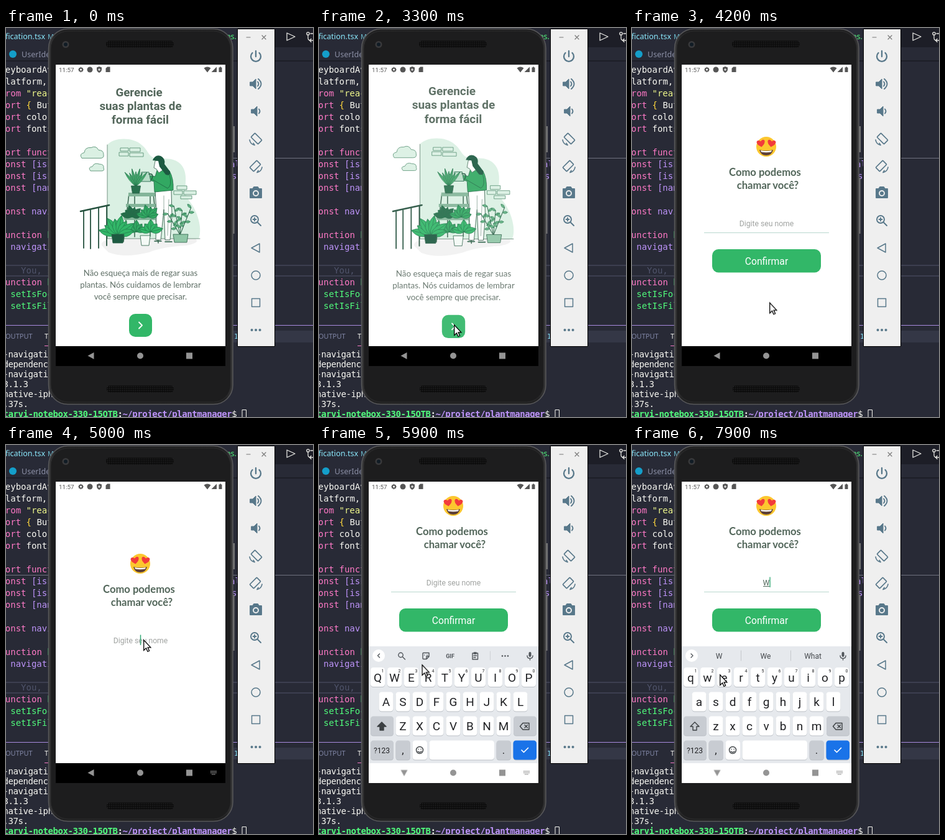
Animation, 494 px wide and 626 px high, one loop 8000 ms. Source, as an HTML page:

```html
<!DOCTYPE html>
<html lang="pt">
<head>
<meta charset="utf-8">
<title>Plant app demo</title>
<style>
html, body { margin: 0; width: 100%; height: 100%; overflow: hidden; background: #282a36; }
svg { display: block; width: 494px; height: 626px; }
text { white-space: pre; }
.code { font: 14px "DejaVu Sans Mono", monospace; }
.term { font: 14px "DejaVu Sans Mono", monospace; letter-spacing: -.43px; fill: #f8f8f2; }
.ui { font-family: "Noto Sans", sans-serif; }
.roboto { font-family: Roboto, sans-serif; }
.lato { font-family: Lato, sans-serif; }
.mid { text-anchor: middle; }
.line { fill: none; stroke-linecap: round; stroke-linejoin: round; }

#welcome, #form, #formBody, #cover, #caret, #keyboard, #nav, #back, #imeIcon, .before, .after, .tools, .hints {
  animation: 8s step-end infinite;
}
#welcome, #form { transform-origin: 216.5px 286px; }
#welcome { animation-name: leave; }
#form { animation-name: enter; }
#formBody { animation-name: lift; }
#cover { animation-name: cover; }
#caret { animation-name: blink; }
#keyboard { animation-name: slide; }
#nav { animation-name: navBar; }
#back { transform-origin: 137px 527.5px; animation-name: turn; }
#imeIcon { animation-name: imeIcon; }
#cursor { animation: pointer 8s linear infinite; }
.before { animation-name: untilTyped; }
.after { animation-name: onceTyped; }
.tools { animation-name: untilHints; }
.hints { animation-name: onceHints; }

@keyframes leave {
  0% { opacity: 1; transform: scale(1); }
  41.25% { opacity: .92; transform: scale(1.01); }
  42.5% { opacity: .72; transform: scale(1.04); }
  43.75% { opacity: .42; transform: scale(1.063); }
  45% { opacity: .14; transform: scale(1.065); }
  46.25%, 100% { opacity: 0; }
}
@keyframes enter {
  0% { opacity: 0; transform: scale(.97); }
  45% { opacity: .5; transform: scale(.98); }
  46.25% { opacity: .88; transform: scale(.995); }
  47.5%, 100% { opacity: 1; transform: none; }
}
@keyframes lift { 0% { transform: none; } 63.75%, 100% { transform: translateY(-93px); } }
@keyframes cover { 0% { opacity: 0; } 62.5% { opacity: 1; } 63.75%, 100% { opacity: 0; } }
@keyframes blink {
  0% { opacity: 0; transform: none; }
  61.25% { opacity: 1; }
  68.75% { opacity: 0; }
  75% { opacity: 1; }
  81.25% { opacity: 0; }
  87.5% { opacity: 1; transform: none; }
  93.75%, 100% { opacity: 1; transform: translateX(5.5px); }
}
@keyframes slide {
  0% { opacity: 0; transform: translateY(60px); }
  63.75% { opacity: .7; transform: translateY(22px); }
  65% { opacity: 1; transform: translateY(1px); }
  66.25%, 100% { opacity: 1; transform: none; }
}
@keyframes navBar { 0% { fill: #000; } 63.75% { fill: #aaa; } 65%, 100% { fill: #fff; } }
@keyframes turn {
  0% { transform: none; }
  63.75% { transform: rotate(-35deg); }
  65% { transform: rotate(-68deg); }
  66.25%, 100% { transform: rotate(-90deg); }
}
@keyframes imeIcon { 0% { opacity: 0; } 61.25%, 100% { opacity: 1; } }
@keyframes untilTyped { 0% { opacity: 1; } 93.75%, 100% { opacity: 0; } }
@keyframes onceTyped { 0% { opacity: 0; } 93.75%, 100% { opacity: 1; } }
@keyframes untilHints { 0% { opacity: 1; } 95%, 100% { opacity: 0; } }
@keyframes onceHints { 0% { opacity: 0; } 95%, 100% { opacity: 1; } }
@keyframes pointer {
  0% { opacity: 0; transform: translate(173px, 13px); animation-timing-function: step-end; }
  8.75% { opacity: 1; transform: translate(173px, 13px); animation-timing-function: step-end; }
  10% { opacity: 1; transform: translate(173px, 13px); animation-timing-function: steps(9); }
  21.25% { transform: translate(213px, 479px); animation-timing-function: step-end; }
  22.5% { transform: translate(217px, 477px); animation-timing-function: step-end; }
  51.25% { transform: translate(217px, 477px); animation-timing-function: steps(3); }
  55% { transform: translate(229px, 370px); animation-timing-function: steps(2); }
  57.5% { transform: translate(221px, 313px); animation-timing-function: step-end; }
  67.5% { transform: translate(221px, 313px); animation-timing-function: steps(8); }
  77.5% { transform: translate(132px, 377px); animation-timing-function: step-end; }
  78.75% { transform: translate(130px, 373px); animation-timing-function: steps(2); }
  81.25% { transform: translate(135px, 372px); animation-timing-function: step-end; }
  85% { transform: translate(137px, 372px); animation-timing-function: steps(4); }
  90% { transform: translate(120px, 370px); animation-timing-function: step-end; }
  97.5% { transform: translate(130px, 370px); animation-timing-function: step-end; }
  98.75%, 100% { opacity: 1; transform: translate(141px, 369px); }
}
</style>
</head>
<body>
<svg viewBox="0 0 494 626">
<defs>
  <linearGradient id="body"><stop offset="0" stop-color="#3b3b3c"/><stop offset=".04" stop-color="#222223"/><stop offset=".5" stop-color="#1c1c1d"/><stop offset=".96" stop-color="#222223"/><stop offset="1" stop-color="#39393a"/></linearGradient>
  <pattern id="mesh" width="3" height="3" patternUnits="userSpaceOnUse"><rect width="3" height="3" fill="#0b0b0b"/><circle cx="1.5" cy="1.5" r=".8" fill="#2b2b2c"/></pattern>
  <clipPath id="screen"><path d="M80 59h273v453H80z"/></clipPath>
  <clipPath id="display"><path d="M80 59h273v485H80z"/></clipPath>
  <path id="heart" d="M0 6Q-7.500 1-6.500-3.500Q-4-7 0-3Q4-7 6.500-3.500Q7.500 1 0 6z" fill="#f23b3b"/>
</defs>

<!-- Editor and terminal -->
<rect width="494" height="626" fill="#282a36"/>
<path d="M433 0h61v31h-61z" fill="#1d1e27"/>
<path d="M0 53h494" stroke="#1d1e27" stroke-width="2"/>
<path d="M0 209.500h494" stroke="#6f7180"/>
<path d="M0 382h494M0 399h494" stroke="#44475a" stroke-width="1.500"/>
<path d="M0 478.500h494" stroke="#a98be0"/>
<g class="ui">
  <text x="-1" y="18" font-size="12.500" fill="#8be9fd">fication.tsx</text>
  <text x="67" y="18" font-size="11" fill="#6fc3d3">M</text>
  <text x="350" y="18" font-size="12.500" fill="#50fa7b">tes.</text>
  <circle cx="11" cy="42" r="6" fill="#149eca"/>
  <text x="25" y="47" font-size="12.500" fill="#8b8fa5">UserIdentification</text>
  <text x="-1" y="500" font-size="11" fill="#8086a6">OUTPUT</text>
  <text x="62" y="500" font-size="11" fill="#f8f8f2">TERMINAL</text>
</g>
<path d="M62 511.500h50" stroke="#ff79c6"/>
<path d="M366 487h128v19H366z" fill="#343746"/>
<g class="line" stroke="#e4e4e0" stroke-width="1.300">
  <path d="M452 8v12l13-6zM486 11v5q0 4 4 4h4M491 17.500l-2.500 2.500 2.500 2.500M490 9h4"/><circle cx="486" cy="9" r="2.200"/>
</g>
<g id="code" class="code"></g>
<g id="terminal" class="term"></g>
<path d="M380 614.500h6.500v12h-6.500z" fill="none" stroke="#f8f8f2"/>

<!-- Phone -->
<path d="M364 158h4v42h-4zM364 241h3.500v90H364z" fill="#777"/>
<rect x="68.500" y="1.500" width="296.500" height="604" rx="31" fill="url(#body)" stroke="#58585a" stroke-width="1.500"/>
<rect x="72" y="5" width="289.500" height="597" rx="28" fill="#1d1d1e" stroke="#2c2c2d"/>
<circle cx="96" cy="26.500" r="5.500" fill="#39393b"/><circle cx="96" cy="26.500" r="3" fill="#111c25"/>
<rect x="161" y="20.500" width="109" height="11" rx="5" fill="url(#mesh)"/>
<rect x="162" y="575.500" width="108" height="11" rx="5" fill="url(#mesh)"/>
<path d="M80 59h273v453H80z" fill="#fff"/>

<g clip-path="url(#screen)">
  <g id="welcome">
    <g class="roboto mid" font-size="18.800" font-weight="700" fill="#52665a">
      <text x="214" y="110">Gerencie</text><text x="216.500" y="132">suas plantas de</text><text x="216" y="154">forma fácil</text>
    </g>
    <g id="art">
      <path d="M163 188C175 175 205 176 218 188C231 198 228 210 248 211C274 207 288 220 289 239C290 257 284 264 297 281C310 299 316 325 310 339H163z" fill="#daf0e3"/>
      <path d="M154 350Q150 339 190 339H305Q313 346 290 350Q252 352 230 361Q190 371 165 361z" fill="#f1f1f1"/>
      <path class="line" d="M163 188V339H312" stroke="#577968" stroke-width=".8"/>
      <g fill="#daf0e3" stroke="#5c9478" stroke-width=".9">
        <path d="M122 209.500q-5-7 4-9q1-9 11-8q8-4 12 4q8 0 8 7q1 6-5 6z"/>
        <path d="M136 230q-5-6 3-7q3-7 11-4q8 0 7 6q2 5-3 5z"/>
        <path d="M182 200h15v6h-15zM199 193h17v6h-17zM199 201h22v6h-22zM184 193h13v5h-13zM275 254h16v6h-16zM270 262h14v6h-14zM286 262h20v6h-20zM281 270h18v5h-18z"/>
      </g>
      <path class="line" d="M120 295L166 285" stroke="#25513e" stroke-width="2.600"/>
      <path class="line" d="M125 295v59M136 293v62M149 290v64M162 287v63" stroke="#25513e" stroke-width="1.800"/>
      <!-- Shelves -->
      <path class="line" d="M198 266h43M195 284h45M190 306h53M198 266l-9 78M237 266l8 80M207 266v70M232 266v69" stroke="#37634d" stroke-width="1.500"/>
      <path d="M197 265h44v6h-44zM193 283h50v5h-50zM190 304h54v5h-54z" fill="#83b599"/>
      <!-- Woman watering -->
      <path d="M240 261h26l1 42-3 38h-8l-2-49-5 49h-8l1-44z" fill="#fff" stroke="#355e4b" stroke-width=".9"/>
      <path class="line" d="M254 270v24M262 276l-2 58" stroke="#6b8d7c" stroke-width=".7"/>
      <path d="M243 229q10-5 20 1q7 12 6 31l-30 3-1-17-10-3 2-7 10 2z" fill="#32a862" stroke="#1d6543" stroke-width=".8"/>
      <path class="line" d="M263 236q5 18-3 22l-24-14" stroke="#1d6543" stroke-width=".8"/>
      <path d="M240 214q5-3 10 1l2 14-6 4-4-6-4-2z" fill="#fff" stroke="#37634d" stroke-width=".8"/>
      <path d="M236 213q4-10 13-7q8 4 6 13l9 12q1 8-7 5l-10-13-2-9z" fill="#1c5a41"/>
      <path d="M218 232h12l3 15h-16zM217 241l-9-7" fill="#b7ddc7" stroke="#37755a"/>
      <path class="line" d="M230 235q9-1 4 9M239 343h11M256 344h11" stroke="#265d43" stroke-width="1.600"/>
      <g id="plants"></g>
    </g>
    <g class="lato mid" font-size="13.200" fill="#5f6f66">
      <text x="216.500" y="399">Não esqueça mais de regar suas</text><text x="216.500" y="418">plantas. Nós cuidamos de lembrar</text><text x="216.500" y="437">você sempre que precisar.</text>
    </g>
    <rect x="198" y="460" width="37" height="37" rx="10" fill="#32b768"/>
    <path class="line" d="M214 473.500l5 5-5 5" stroke="#fff" stroke-width="1.800"/>
  </g>

  <g id="form"><g id="formBody">
    <circle cx="216" cy="191" r="16" fill="#fcc72f"/>
    <path d="M205 196q11 3 22 0q-2 9-11 9t-11-9z" fill="#5d4037"/>
    <path d="M207 197q9 2 18 0l-1 2.500q-8 1.500-16 0z" fill="#fff"/>
    <use href="#heart" transform="translate(207.500 185.500) rotate(-10)"/>
    <use href="#heart" transform="translate(224.500 185.500) rotate(10)"/>
    <g class="lato mid" font-size="16.600" font-weight="700" fill="#52665a"><text x="214" y="238">Como podemos</text><text x="218.500" y="259">chamar você?</text></g>
    <text class="roboto mid before" x="216.500" y="318.500" font-size="12.200" fill="#a0a3a1">Digite seu nome</text>
    <g class="after"><text class="roboto mid" x="216" y="318.500" font-size="12.200" fill="#52665a">W</text><path d="M211 320.500h10.500" stroke="#52665a"/></g>
    <path id="caret" d="M216.500 305.500v16.500" stroke="#32a874" stroke-width="1.500"/>
    <path d="M116 329.500h201" stroke="#b9d8cf"/>
    <rect x="129" y="356" width="175" height="37.500" rx="10" fill="#32b768"/>
    <text class="roboto mid" x="216.500" y="380.500" font-size="15.700" fill="#fff">Confirmar</text>
  </g></g>
  <path id="cover" d="M80 325h273v187H80z" fill="#fff"/>
</g>

<!-- Status bar -->
<text class="roboto" x="85" y="70.500" font-size="9.800" fill="#555">11:57</text>
<g fill="#555">
  <circle cx="120.500" cy="67" r="2.600" fill="none" stroke="#555" stroke-width="2"/>
  <path class="line" d="M120.500 63v8M116.500 67h8M117.700 64.200l5.600 5.600M123.300 64.200l-5.600 5.600" stroke="#555" stroke-width="1"/>
  <circle cx="120.500" cy="67" r="1.500" fill="#fff"/>
  <circle cx="135" cy="67" r="4.500"/>
  <path d="M150 62l4 1.500v3q0 3.500-4 5.500q-4-2-4-5.500v-3zM163 62.500h4.500v8.500h-7v-6z"/>
  <path d="M150 65v4M148 67h4" stroke="#fff"/>
  <path d="M318.500 64.500q5.500-4 11 0l-5.500 7zM339 62.500v8.500h-8.500zM342.500 63.500h1.500v-1h2v1h1.500V71h-5z"/>
</g>

<!-- Keyboard and navigation -->
<g clip-path="url(#display)">
  <g id="keyboard" class="roboto">
    <path d="M80 324h273v220H80z" fill="#e6e9ed"/>
    <g id="keys"></g>
    <circle cx="96" cy="339" r="10" fill="#fff"/>
    <g class="line" stroke="#50555a" stroke-width="1.400">
      <g class="tools">
        <path d="M97.500 336l-3 3 3 3"/>
        <circle cx="131.500" cy="338" r="3.700"/><path d="M134.500 341l4 4"/>
        <path d="M168 334.500h9v6l-4 4h-5q-1 0-1-1v-8q0-1 1-1zM173 344v-4h4M169.500 338h.2M174 338h.2"/>
        <path d="M247 335h8.500v10H247zM249.500 334h3.500v2h-3.500M249 339h4.500M249 342h3"/>
        <path d="M275.500 332v14" stroke="#cdd0d4" stroke-width="1"/>
      </g>
      <path class="hints" d="M95 336l3 3-3 3"/>
      <path class="hints" d="M175.500 331v16M255.500 331v16" stroke="#c5c8cc" stroke-width="1"/>
      <path d="M339.500 335v4" stroke-width="4"/><path d="M335 339q0 4.500 4.500 4.500t4.500-4.500M339.500 343.500v2.500"/>
    </g>
    <text class="mid tools" x="211" y="342.500" font-size="9" font-weight="700" fill="#50555a">GIF</text>
    <g class="tools" fill="#50555a"><circle cx="295" cy="339.500" r="1.300"/><circle cx="299.500" cy="339.500" r="1.300"/><circle cx="304" cy="339.500" r="1.300"/></g>
    <g class="mid hints" font-size="12" fill="#44484c"><text x="140" y="343.500">W</text><text x="215" y="343.500">We</text><text x="291" y="343.500">What</text></g>
    <g class="line" stroke="#3c4043" stroke-width="1.400">
      <path class="before" d="M101 446l7 7h-4v6h-6v-6h-4z" fill="#3c4043"/>
      <path class="after" d="M101 446l7 7h-4v6h-6v-6h-4z"/>
      <path d="M328 447.500h10v10.500h-10l-4.500-5.250zM331 450.500l4.500 4.500M335.500 450.500l-4.500 4.500"/>
      <circle cx="162" cy="491" r="5.500"/><path d="M159 493q3 3 6 0M160 489.500h.2M164 489.500h.2"/>
      <path d="M326 491l3.500 3.500 7-7" stroke="#fff" stroke-width="1.700"/>
    </g>
  </g>
  <path id="nav" d="M80 512h273v32H80z"/>
  <g fill="#949494">
    <path id="back" d="M131.500 527.500l10-5.500v11z"/>
    <circle cx="216" cy="527.500" r="5"/><path d="M290 522.500h10v10h-10z"/>
    <path id="imeIcon" d="M329 525h10M329 527.500h10M331 530h6" stroke="#949494" stroke-width="1.400" stroke-dasharray="1.400 .7"/>
  </g>
</g>

<!-- Emulator controls -->
<path d="M372.500 1.500h60v511h-60z" fill="#efefef" stroke="#000"/>
<path class="line" d="M387 15h6M412 12l6 6M418 12l-6 6" stroke="#777" stroke-width="1.200"/>
<g class="line" stroke="#58788a" stroke-width="1.900">
  <path d="M402 37v9M396.500 40a8 8 0 1 0 11 0" stroke-width="2.300"/>
  <path d="M393 87h4l5-5v16l-5-5h-4zM395 131h4l5-5v16l-5-5h-4z" fill="#58788a" stroke-width="1"/>
  <path d="M405 86.500q3 3.500 0 7M406 82q9 8 0 16M407 130.500q3 3.500 0 7"/>
  <g id="rotate" stroke-width="1.700">
    <rect x="-8" y="-4.500" width="16" height="9" rx="1" transform="translate(403 178) rotate(45)"/>
    <path d="M392 180q1 7 8 8.500M400 188.500l-2-3"/>
  </g>
  <use href="#rotate" transform="matrix(-1 0 0 1 804 44)"/>
  <path d="M393 259h4l2-3h6l2 3h4v14h-18z" fill="#58788a"/>
  <circle cx="402" cy="266" r="4" fill="#58788a" stroke="#efefef"/>
  <circle cx="400" cy="308" r="6"/><path d="M405 313l5 5M397.500 308h5M400 305.500v5"/>
  <path d="M395 354l13-7v14z" stroke-width="1.500"/>
  <circle cx="402" cy="398" r="7" stroke-width="1.500"/><path d="M395.500 435.500h13v13h-13z" stroke-width="1.500"/>
  <path d="M395.500 486h.1M402 486h.1M408.500 486h.1" stroke-width="4"/>
</g>

<path id="cursor" d="M.7 .9V17.500l3.800-3.600 2.500 5.600 2.600-1.200-2.500-5.500h4.700z" fill="#fff" stroke="#000" stroke-width="1.300"/>
</svg>
<script>
const fill = (id, markup) => { document.getElementById(id).innerHTML = markup; };
const pink = '#ff79c6', white = '#f8f8f2', violet = '#bd93f9', green = '#50fa7b', yellow = '#f1fa8c';

const row = (y, col, ...parts) => `<text x="${-26.5 + col * 8.43}" y="${y}">` +
  parts.map(([color, s]) => `<tspan fill="${color}">${s}</tspan>`).join('') + '</text>';
const hook = (y, name) => row(y, 2, [pink, 'const '], [violet, '[' + name]);
fill('code', [
  row(72, 2, [white, 'KeyboardAvoidingView,']),
  row(91, 2, [white, 'Platform,']),
  row(110, 0, [white, '} '], [pink, 'from '], [yellow, '"react-native"']),
  row(129, 0, [pink, 'import '], ['#ffd83d', '{ '], [white, 'Button']),
  row(148, 0, [pink, 'import '], [white, 'colors']),
  row(167, 0, [pink, 'import '], [white, 'fonts']),
  row(205, 0, [pink, 'export function']),
  hook(224, 'isFocused'), hook(243, 'isFilled'), hook(262, 'name'),
  row(300, 2, [pink, 'const '], [violet, 'navigation']),
  row(338, 2, [pink, 'function '], [green, 'handle']),
  row(357, 4, [violet, 'navigation']),
  row(395, 6, ['#50546b', 'You, seconds']),
  row(414, 2, [pink, 'function '], [green, 'handle']),
  row(433, 4, [green, 'setIsFocused']),
  row(452, 4, [green, 'setIsFilled']),
  `<text x="360" y="224" fill="${violet}">al</text><text x="363" y="243" fill="${violet}">se</text>`,
  `<text x="367" y="500" fill="#8be9fd" font-size="11">1</text>`
].join(''));

const output = ['-navigation', 'dependencies', '-navigation', '3.1.3', 'native-iphone', '.37s.'];
fill('terminal', output.map((s, i) => `<text x="-4.600" y="${530 + i * 16}">${s}</text>`).join('') +
  `<text x="-4.600" y="626" font-weight="700"><tspan fill="${green}">tarvi-notebox-330-15QTB</tspan>:` +
  `<tspan fill="${violet}">~/project/plantmanager</tspan><tspan font-weight="400">$</tspan></text>`);

// Fans of leaves growing from a common root
const leaf = (x, y, angle, len, w, color) =>
  `<path d="M0 0Q${w} ${-len / 2} 0 ${-len}Q${-w} ${-len / 2} 0 0V${-len}" fill="${color}" stroke="#1f7048" stroke-width=".6" transform="translate(${x} ${y}) rotate(${angle})"/>`;
const fan = (x, y, n, spread, len, w, color) => Array.from({ length: n }, (_, i) => {
  const k = i / (n - 1) * 2 - 1;
  return leaf(x, y, k * spread, len * (1 - .18 * (i % 2)), w, color);
}).join('');
const pot = (x, y, w, h, color) =>
  `<path d="M${x - w / 2} ${y}h${w}l-2 ${h}h${4 - w}z" fill="${color}" stroke="#285e45" stroke-width=".8"/>`;
const branch = (x, y, angle, len) => `<g transform="translate(${x} ${y}) rotate(${angle})">` +
  `<path d="M0 0V${-len}" stroke="#285e45"/>` +
  Array.from({ length: 5 }, (_, i) => leaf(0, -len * (.3 + i * .17), i % 2 ? 65 : -65, 8, 4, '#79c797')).join('') + '</g>';
fill('plants', [
  fan(209, 255, 7, 38, 29, 4, '#51b878'), pot(209, 254, 15, 12, '#28704d'),
  fan(203, 304, 6, 75, 19, 9, '#256b49'), fan(229, 304, 6, 75, 20, 9, '#32a862'),
  fan(210, 328, 5, 70, 19, 9, '#32a862'), fan(233, 328, 5, 75, 20, 10, '#32b768'),
  pot(224, 334, 16, 16, '#f4faf6'),
  fan(180, 333, 8, 76, 32, 12, '#32b768'), pot(180, 332, 20, 14, '#1d5a41'),
  [-30, -12, 5, 22].map((a, i) => branch(280, 333, a, 40 + i % 2 * 8)).join(''),
  pot(281, 332, 24, 13, '#8fc6a6')
].join(''));

const key = (x, y, w, color) => `<rect x="${x}" y="${y + 1}" width="${w}" height="31" rx="4.500" fill="#bcc0c6"/>` +
  `<rect x="${x}" y="${y}" width="${w}" height="31" rx="4.500" fill="${color}"/>`;
const label = (x, y, s, size, cls = '') => `<text class="mid ${cls}" x="${x}" y="${y}" font-size="${size}" fill="#202124">${s}</text>`;
const letters = (s, x, y) => [...s].map((c, i) => {
  const cx = x + i * 27;
  return key(cx - 11.5, y, 23, '#fff') + label(cx, y + 22.5, c, 19, 'before') + label(cx, y + 22.5, c.toLowerCase(), 19, 'after');
}).join('');
const gray = '#c8ccd2';
fill('keys', letters('QWERTYUIOP', 94.5, 358) + letters('ASDFGHJKL', 108, 397.5) + letters('ZXCVBNM', 135, 436.5) +
  [...'1234567890'].map((d, i) => label(102.5 + i * 27, 366, d, 7)).join('') +
  key(83, 436.5, 37, gray) + key(313, 436.5, 37, gray) +
  key(83, 475.5, 37, gray) + key(123.5, 475.5, 23.5, gray) + key(150.5, 475.5, 23.5, '#fff') +
  key(177.5, 475.5, 104.5, '#fff') + key(285.5, 475.5, 23.5, gray) + key(312.5, 475.5, 37.5, '#1a73e8') +
  label(101, 495.5, '?123', 12) + label(135, 497, ',', 17) + label(297, 497, '.', 17));
</script>
</body>
</html>
```
